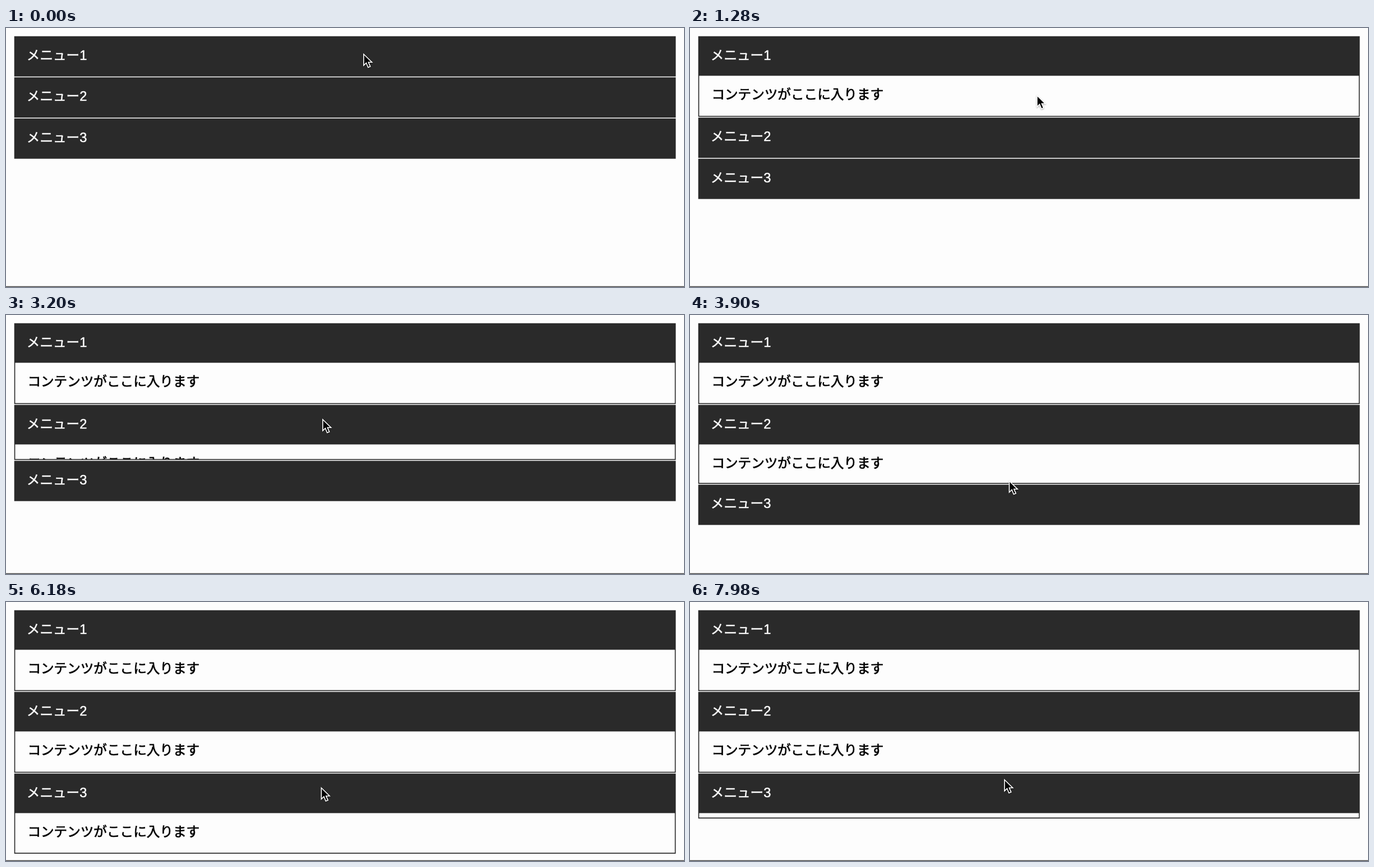
These frames come from a looping animation (1209 px wide and 463 px high, 8 s). An HTML page:

```html
<!DOCTYPE html>
<html lang="ja">
<head>
<meta charset="utf-8">
<style>
  html, body { margin: 0; width: 100%; height: 100%; overflow: hidden; background: #fdfdfd; }
  svg { display: block; }
  text { font: 23.6px "Liberation Sans", "Noto Sans CJK JP", "Noto Sans CJK", sans-serif; }
  .title { fill: #fff; stroke: #fff; stroke-width: .5; }
  .content { fill: #000; stroke: #000; stroke-width: .7; }
  #cursor { filter: drop-shadow(0 1px 1px rgba(0, 0, 0, .35)); }
</style>
</head>
<body>
<svg width="1209" height="463" viewBox="0 0 1209 463">
  <rect y="461.6" width="1209" height="1.4" fill="#484848"/>
  <g id="menu"></g>
  <path id="cursor" d="M.8 1.8V21.8L5.4 17.4L8.7 25.5L12.6 23.8L9.2 16.2H15.5Z"
        fill="#000" stroke="#fff" stroke-width="1.6"/>
</svg>
<script>
const LOOP = 8000, SLIDE = 1400;
const MARGIN = 14.7, WIDTH = 1179.6, HEAD = 70.5, PANEL = 72.5, LINE = 1.5;

// When each panel starts to open and, for the last one, to close again
const SLIDES = [{ open: 40 }, { open: 2878 }, { open: 5020, close: 7143 }];

// Cursor movements
const HOME = { x: 637, y: 45 };
const MOVES = [
  { from: 860, to: 1280, x: 618, y: 119 },
  { from: 1660, to: 2400, x: 564, y: 185 },
  { from: 3400, to: 3900, x: 568.5, y: 295 },
  { from: 3900, to: 4400, x: 561.5, y: 330.5 },
  { from: 7600, to: 7980, x: 560, y: 316 }
];

const progress = (t, from, to) => Math.min(1, Math.max(0, (t - from) / (to - from)));
const smooth = p => p * p * (3 - 2 * p);

// The CSS "ease" curve, cubic-bezier(.25, .1, .25, 1), solved by bisection
function ease(x) {
  const bezier = (s, a, b) => 3 * (1 - s) ** 2 * s * a + 3 * (1 - s) * s * s * b + s ** 3;
  let low = 0, high = 1;
  for (let i = 0; i < 20; i++) {
    const mid = (low + high) / 2;
    if (bezier(mid, .25, .25) < x) low = mid; else high = mid;
  }
  return bezier(high, .1, 1);
}

const slide = (t, from) => ease(progress(t, from, from + SLIDE));

const menu = document.getElementById('menu');
const cursor = document.getElementById('cursor');

const items = SLIDES.map(({ open, close = Infinity }, i) => {
  menu.insertAdjacentHTML('beforeend', `<g>
    <rect width="${WIDTH}" fill="#2a2a2a"/>
    <text class="title" x="22.1" y="42">メニュー${i + 1}</text>
    <svg x="${LINE}" y="${HEAD}" width="${WIDTH - 2 * LINE}" overflow="hidden">
      <rect width="100%" height="100%" fill="#fdfdfd"/>
      <text class="content" x="22.2" y="41.9">コンテンツがここに入ります</text>
    </svg></g>`);
  const group = menu.lastElementChild;
  return { open, close, group, box: group.querySelector('rect'), panel: group.querySelector('svg') };
});

function draw(t) {
  let top = MARGIN;
  for (const { open, close, group, box, panel } of items) {
    const height = PANEL * (t < close ? slide(t, open) : 1 - slide(t, close));
    const total = HEAD + height + LINE;
    group.setAttribute('transform', `translate(${MARGIN} ${top})`);
    box.setAttribute('height', total);
    panel.setAttribute('height', height);
    top += total + LINE;
  }

  let { x, y } = HOME;
  for (const move of MOVES) {
    const p = smooth(progress(t, move.from, move.to));
    x += (move.x - x) * p;
    y += (move.y - y) * p;
  }
  cursor.setAttribute('transform', `translate(${x} ${y})`);
}

const start = performance.now();
function tick() {
  draw((performance.now() - start) % LOOP);
  requestAnimationFrame(tick);
}
tick();
</script>
</body>
</html>
```
